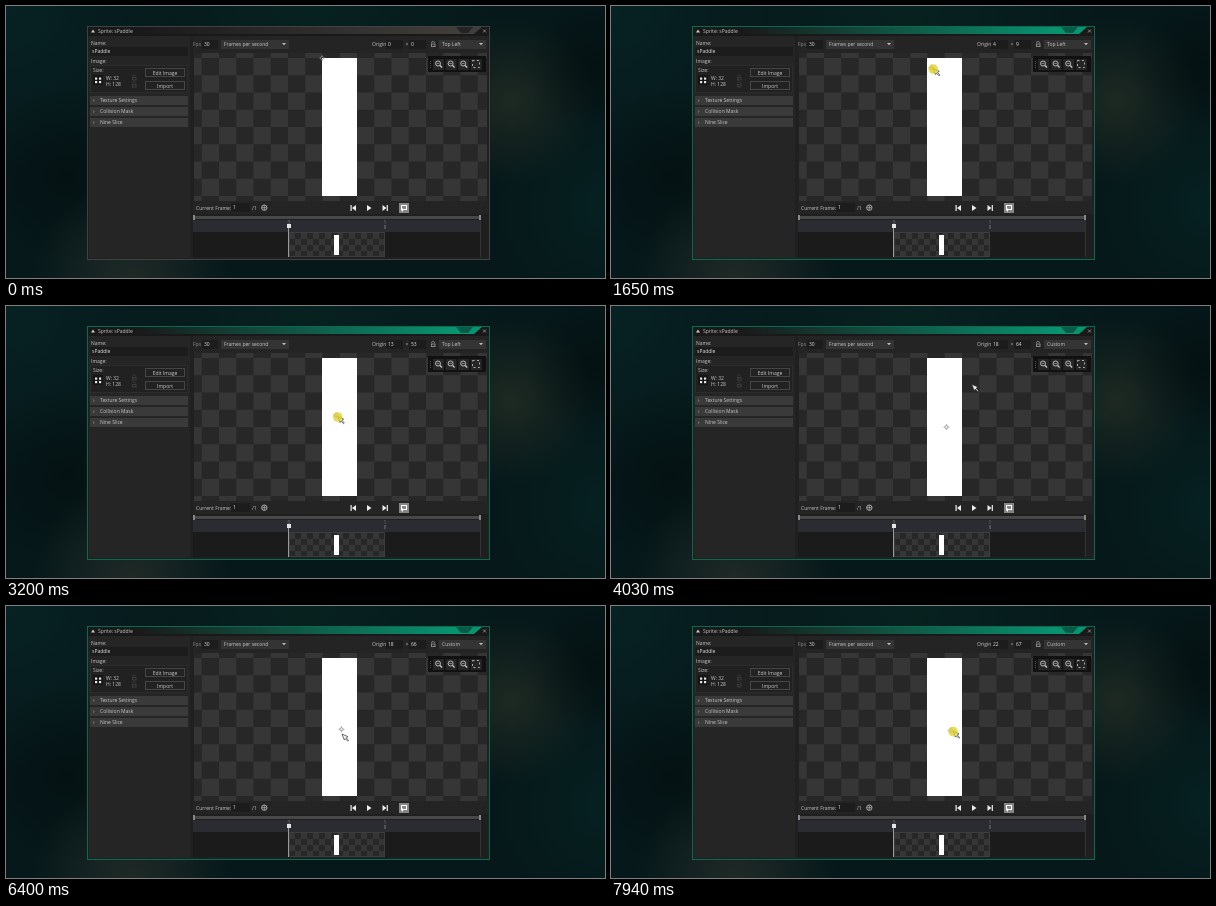
An HTML page with a canvas for the animation above (8 s loop, 599x272 px).

```html
<!DOCTYPE html>
<html lang="en">
<head>
<meta charset="utf-8">
<title>Sprite editor</title>
<style>
html, body { margin: 0; width: 100%; height: 100%; overflow: hidden; background: #07191a; }
canvas { display: block; }
</style>
</head>
<body>
<canvas id="stage" width="599" height="272"></canvas>
<script>
const ctx = document.getElementById('stage').getContext('2d');
const LOOP = 8000, START = 130, STEP = 69.7;
const PRESS = 1300, ACTIVATE = 1340, RELEASE = 3690, REGRAB = 6325, DRAG_AGAIN = 6440;
const SPRITE = { x: 316, y: 52, w: 35, h: 138 }, ZOOM = 1.08;

// Stops of the pointer; sway bends the way to a stop into an S
const STOPS = [
  { t: 130, x: 572, y: 228 },
  { t: 920, x: 316, y: 52 },
  { t: 1310, x: 316, y: 52 },
  { t: 2220, x: 343, y: 98 },
  { t: 3200, x: 331.7, y: 110.5, sway: -8 },
  { t: 3640, x: 337.4, y: 122 },
  { t: 3700, x: 337.4, y: 122 },
  { t: 4400, x: 388, y: 28 },
  { t: 5010, x: 406, y: 45.5 },
  { t: 6200, x: 336, y: 128 },
  { t: 6440, x: 336, y: 128 },
  { t: 8010, x: 341.5, y: 126.3, sway: 29 }
];

const ease = k => k * k * (3 - 2 * k);

function pointerAt(t) {
  const i = Math.max(1, STOPS.findIndex(s => s.t >= t));
  const a = STOPS[i - 1], b = STOPS[i];
  const k = ease((t - a.t) / (b.t - a.t));
  const bend = (b.sway || 0) * Math.sin(2 * Math.PI * k);
  return { x: a.x + (b.x - a.x) * k - bend / 2, y: a.y + (b.y - a.y) * k + bend };
}

function originAt(t, p) {
  if (t < PRESS) return [0, 0];
  if (t >= RELEASE && t < DRAG_AGAIN) return [18, t < REGRAB ? 64 : 66];
  return [p.x - 318, p.y - 53].map(v => Math.max(0, Math.round(v / ZOOM)));
}

function rect(x, y, w, h, fill, stroke) {
  if (fill) { ctx.fillStyle = fill; ctx.fillRect(x, y, w, h); }
  if (stroke) {
    ctx.strokeStyle = stroke; ctx.lineWidth = 1;
    ctx.strokeRect(x + .5, y + .5, w - 1, h - 1);
  }
}

function text(s, x, y, color = '#c8c8c8', align = 'left') {
  ctx.font = '5px "Open Sans", sans-serif';
  ctx.textAlign = align;
  ctx.fillStyle = color;
  ctx.fillText(s, x, y);
}

function poly(points, fill, stroke) {
  ctx.beginPath();
  points.forEach(([x, y]) => ctx.lineTo(x, y));
  ctx.closePath();
  if (fill) { ctx.fillStyle = fill; ctx.fill(); }
  if (stroke) { ctx.strokeStyle = stroke; ctx.lineWidth = .7; ctx.stroke(); }
}

function line(x0, y0, x1, y1, color, width = 1) {
  ctx.strokeStyle = color; ctx.lineWidth = width;
  ctx.beginPath(); ctx.moveTo(x0, y0); ctx.lineTo(x1, y1); ctx.stroke();
}

function circle(x, y, r, fill, stroke, width = 1) {
  ctx.beginPath(); ctx.arc(x, y, r, 0, 7);
  if (fill) { ctx.fillStyle = fill; ctx.fill(); }
  if (stroke) { ctx.strokeStyle = stroke; ctx.lineWidth = width; ctx.stroke(); }
}

function glow(x, y, r, rgb, alpha) {
  const g = ctx.createRadialGradient(x, y, 0, x, y, r);
  g.addColorStop(0, `rgba(${rgb},${alpha})`);
  g.addColorStop(1, `rgba(${rgb},0)`);
  rect(0, 0, 599, 272, g);
}

function checker({ x, y, w, h }, size, x0 = x, y0 = y) {
  rect(x, y, w, h, '#272727');
  ctx.save();
  ctx.beginPath(); ctx.rect(x, y, w, h); ctx.clip();
  ctx.fillStyle = '#363636';
  const left = Math.floor((x - x0) / size), top = Math.floor((y - y0) / size);
  for (let j = top; y0 + j * size < y + h; j++)
    for (let i = left; x0 + i * size < x + w; i++)
      if ((i + j) % 2 === 0) ctx.fillRect(x0 + i * size, y0 + j * size, size, size);
  ctx.restore();
}

const arrowDown = (x, y) => poly([[x - 2, y - 1], [x + 2, y - 1], [x, y + 1.3]], '#bbb');
const triangle = (x, dx) => poly([[x, 199], [x, 205], [x + dx, 202]], '#eee');

function lock(x, y, color) {
  rect(x - 2, y, 4.5, 3.5, null, color);
  ctx.beginPath(); ctx.arc(x, y - .5, 1.6, Math.PI, 0);
  ctx.strokeStyle = color; ctx.lineWidth = .8; ctx.stroke();
}

function field(value, x, w, y = 34) {
  rect(x, y, w, 9, '#1c1c1c');
  text(value, x + 2, y + 6.2, '#e0e0e0');
}

function dropdown(label, x, w) {
  rect(x, 34, w, 9, '#343434');
  text(label, x + 3, 40);
  arrowDown(x + w - 5, 38);
}

function backdrop() {
  rect(0, 0, 599, 272, '#06181a');
  glow(0, 0, 170, '8,44,44', .5);
  glow(300, -10, 200, '8,44,38', .5);
  glow(60, 170, 90, '3,12,13', .5);
  glow(125, 275, 100, '46,52,46', .65);
  glow(505, 95, 85, '42,50,38', .65);
  glow(590, 60, 70, '3,10,10', .5);
  glow(599, 200, 110, '6,44,42', .4);
}

function windowFrame(active) {
  const [rgb, border, notch] = active
    ? ['8,148,112', '#0b694f', '#075c48']
    : ['64,61,58', '#3f4240', '#242424'];
  rect(81, 20, 403, 234, '#202020');
  rect(82, 21, 401, 9, '#191919');
  const g = ctx.createLinearGradient(130, 0, 450, 0);
  g.addColorStop(0, `rgba(${rgb},0)`);
  g.addColorStop(.5, `rgba(${rgb},.5)`);
  g.addColorStop(1, `rgba(${rgb},1)`);
  poly([[82, 21], [476, 21], [468, 28], [82, 28]], g);
  poly([[450, 21], [467, 21], [462, 27], [455, 27]], notch);
  rect(81, 20, 403, 234, null, border);
  poly([[85, 26.5], [87, 23.5], [89, 26.5]], '#c8c8c8');
  text('Sprite: sPaddle', 92, 27);
  line(477, 23.5, 480, 26.5, '#aaa', .7);
  line(480, 23.5, 477, 26.5, '#aaa', .7);
}

function button(label, y) {
  rect(139, y, 40, 9, '#222', '#454545');
  text(label, 159, y + 6.5, '#ccc', 'center');
}

function sidePanel() {
  rect(83, 30, 101, 222, '#252525');
  text('Name:', 85, 38.5);
  field('sPaddle', 84, 98, 41);
  text('Image:', 85, 57);
  rect(84, 59, 98, 28, '#212121', '#2c2c2c');
  text('Size:', 87, 66);
  rect(87, 69, 10, 10, '#151515');
  for (const x of [89, 93]) for (const y of [71.5, 75]) rect(x, y, 2.2, 2.2, '#e4e4e4');
  text('W: 32', 100, 74);
  text('H: 128', 100, 80);
  lock(128, 71, '#3c3c3c');
  lock(128, 78, '#3c3c3c');
  button('Edit Image', 62);
  button('Import', 75);
  ['Texture Settings', 'Collision Mask', 'Nine Slice'].forEach((label, i) => {
    const y = 90 + i * 11;
    rect(84, y, 98, 9, '#3a3a3a');
    text('›', 87, y + 6);
    text(label, 94, y + 6.2);
  });
}

function toolbar(origin, preset) {
  rect(187, 30, 295, 17, '#242424');
  text('Fps', 187, 40, '#8c8c8c');
  field('30', 196, 16);
  dropdown('Frames per second', 215, 68);
  text('Origin', 366, 40);
  field(origin[0], 380, 17);
  text('×', 399.5, 40, '#aaa');
  field(origin[1], 403, 17);
  lock(427, 37.5, '#888');
  dropdown(preset, 433, 47);
}

function zoomIcons() {
  rect(422, 50, 58, 16, '#111');
  for (let y = 55; y < 62; y += 2) rect(424, y, 1, 1, '#555');
  for (let i = 0; i < 4; i++) {
    const x = 432 + i * 12.6;
    rect(x - 5, 53, 11, 11, '#262626');
    if (i === 3) continue;
    circle(x, 57.5, 2.5, null, '#ccc', .9);
    line(x + 2, 59.5, x + 4, 61.5, '#ccc', 1.2);
    line(x - 1.3, 57.5, x + 1.3, 57.5, '#ccc', .6);
  }
  ctx.setLineDash([2, 2.5]);
  rect(466, 54, 8, 8, null, '#aaa');
  ctx.setLineDash([]);
}

function playback() {
  rect(187, 195, 295, 13, '#242424');
  text('Current Frame:', 190, 203.5);
  field('1', 225, 19, 197);
  text('/1', 246, 203.5);
  circle(258.3, 201.7, 2.7, null, '#bbb', .9);
  line(256, 201.7, 260.6, 201.7, '#bbb', .7);
  line(258.3, 199.4, 258.3, 204, '#bbb', .7);
  rect(344.5, 199, 1.2, 6, '#eee');
  triangle(350, -4);
  triangle(361, 4.5);
  triangle(376.5, 4);
  rect(380.7, 199, 1.2, 6, '#eee');
  rect(393, 197, 10, 10, '#858585');
  rect(395, 199, 6, 5, null, '#fff');
  poly([[397, 202], [397, 206], [395, 204]], '#fff');
}

function timeline() {
  rect(187, 208, 295, 44, '#1f1f1f');
  rect(188, 210, 286, 3, '#484848');
  for (const x of [187, 473]) rect(x, 209, 2, 5, '#888');
  rect(187, 214, 287, 12, '#2a2c31');
  rect(187, 226, 287, 25, '#1b1b1b');
  line(474.5, 214, 474.5, 251, '#333');
  checker({ x: 283, y: 227, w: 95, h: 23 }, 6);
  rect(283, 226, 96, 25, null, '#3d3d3d');
  rect(328, 229, 5, 20, '#fff');
  text('0', 281.5, 217.5, '#777');
  text('1', 377.5, 217.5, '#777');
  line(379, 219, 379, 223, '#777');
  line(282.5, 222, 282.5, 251, '#999');
  rect(281, 218, 4, 4, '#e4e4e4');
}

function originMark([ox, oy]) {
  const x = SPRITE.x + ox * ZOOM, y = SPRITE.y + oy * ZOOM;
  circle(x, y, 1.6, null, '#888', .7);
  for (const d of [-1, 1]) {
    line(x + d, y, x + d * 3, y, '#888', .6);
    line(x, y + d, x, y + d * 3, '#888', .6);
  }
}

function pointer({ x, y }, pressed) {
  poly([[0, 0], [6, 2.7], [4.2, 3.8], [6.6, 6.5], [5.8, 7.2], [3.3, 4.7], [2.3, 6]]
    .map(([dx, dy]) => [x + dx, y + dy]), '#f2f2f2', '#333');
  if (pressed) circle(x, y + .5, 4.8, 'rgba(224,210,40,.78)');
}

function draw(ms) {
  const t = START + Math.floor((ms - START + 8) / STEP) * STEP;
  const p = pointerAt(t), origin = originAt(t, p);
  const pressed = (t > PRESS && t < RELEASE) || t >= DRAG_AGAIN;
  backdrop();
  windowFrame(t > ACTIVATE);
  sidePanel();
  toolbar(origin, t < RELEASE ? 'Top Left' : 'Custom');
  checker({ x: 188, y: 47, w: 293, h: 148 }, 17.25, 316.5, SPRITE.y);
  rect(SPRITE.x, SPRITE.y, SPRITE.w, SPRITE.h, '#fff');
  zoomIcons();
  playback();
  timeline();
  originMark(origin);
  if (t >= START) pointer(p, pressed);
}

function tick() {
  draw(performance.now() % LOOP);
  requestAnimationFrame(tick);
}
tick();
</script>
</body>
</html>
```
